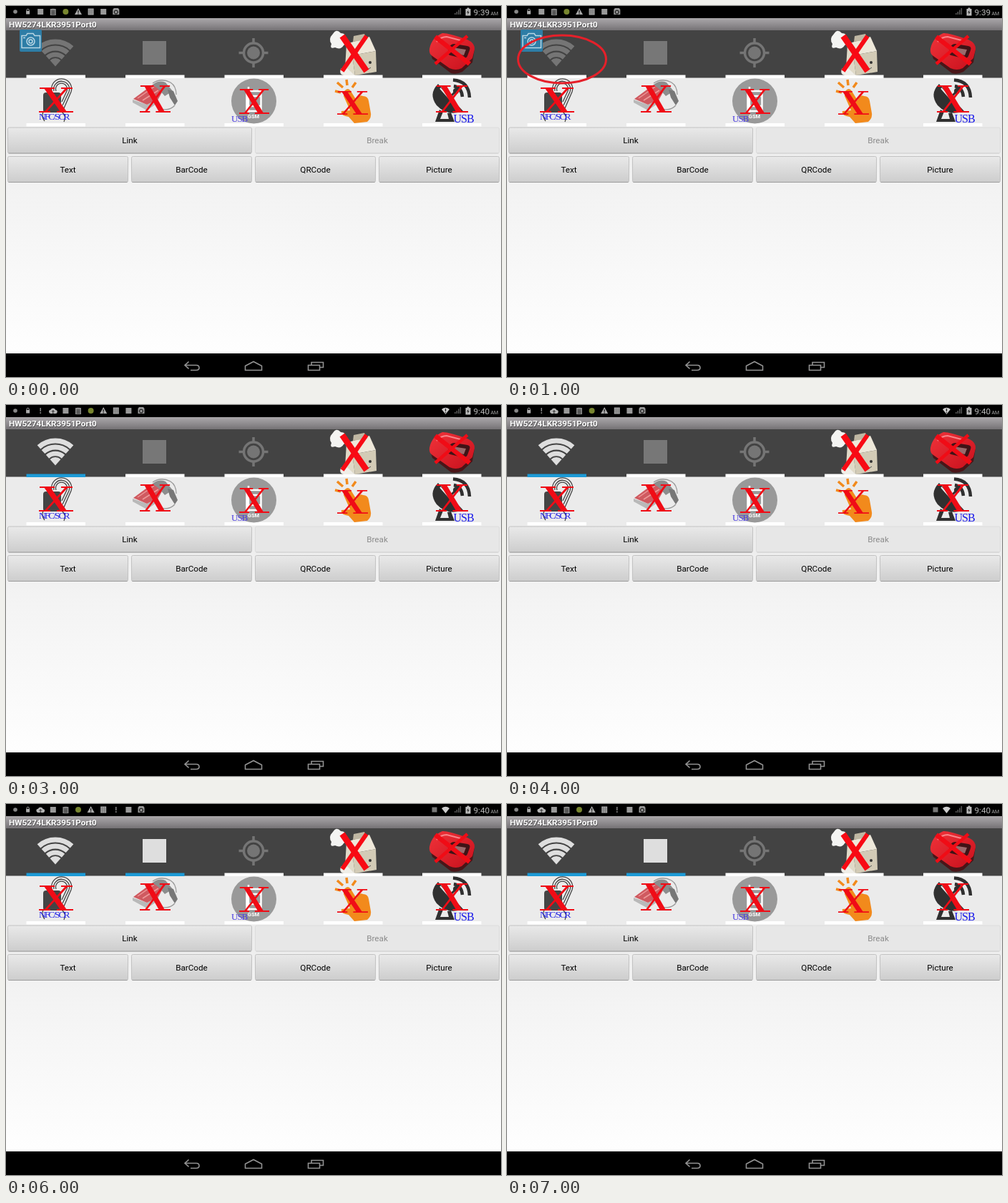
Animation, 692 px wide and 519 px high, one loop 8 s. Source, as an HTML page:

```html
<!DOCTYPE html>
<html lang="en">
<head>
<meta charset="utf-8">
<title>Port panel</title>
<style>
  html, body { margin: 0; width: 100%; height: 100%; overflow: hidden; background: #000; }
  svg { display: block; width: 692px; height: 519px; }
  text { font-family: Roboto, sans-serif; }
  .serif { font-family: "Liberation Serif", serif; }
</style>
</head>
<body>
<svg viewBox="0 0 692 519">
  <defs>
    <linearGradient id="title" x2="0" y2="1">
      <stop offset="0" stop-color="#aaa7aa"/><stop offset=".5" stop-color="#918e91"/><stop offset="1" stop-color="#757275"/>
    </linearGradient>
    <linearGradient id="page" x2="0" y2="1">
      <stop offset="0" stop-color="#ebebeb"/><stop offset=".3" stop-color="#f3f3f3"/><stop offset="1" stop-color="#fefefe"/>
    </linearGradient>
    <linearGradient id="key" x2="0" y2="1">
      <stop offset="0" stop-color="#e9e9e9"/><stop offset="1" stop-color="#cdcdcd"/>
    </linearGradient>
    <linearGradient id="red" x2="1" y2="1">
      <stop offset="0" stop-color="#f0333a"/><stop offset="1" stop-color="#c8101c"/>
    </linearGradient>

    <!-- status bar icons, centred on 0,0 -->
    <g id="usb"><circle r="2.800" fill="#888"/></g>
    <g id="lock"><rect x="-2.500" y="-1" width="5" height="4.500" fill="#aaa"/><path d="M-1.600-1v-1.200a1.600 1.600 0 0 1 3.200 0V-1" fill="none" stroke="#aaa"/></g>
    <g id="mail"><rect x="-4" y="-4" width="8" height="8" fill="#999"/></g>
    <g id="clip"><path d="M-4-4h8v9h-8z" fill="#888"/><path d="M-2-4.500h4M-2.500-1h5M-2.500 1.200h5M-2.500 3.300h5" stroke="#222"/></g>
    <g id="bot"><circle r="4" fill="#78862f"/></g>
    <g id="warn"><path d="M0-5 5 4H-5z" fill="#aaa"/><path d="M0-2v3.600M0 2.200v1.200" stroke="#111" stroke-width="1.200"/></g>
    <g id="note"><path d="M-4-4.500h8v9h-8z" fill="#aaa"/><path d="M-4-2h8M-4 0h8M-4 2h8M-1.400-4v8M1.400-4v8" stroke="#666" stroke-width=".6"/></g>
    <g id="bag"><rect x="-4" y="-4" width="8" height="8" fill="#999"/></g>
    <g id="shot"><path d="M-3-5h6l1.500 2v7h-9v-7z" fill="#999"/><circle cy=".5" r="2.400" fill="none" stroke="#222" stroke-width="1.300"/></g>
    <g id="cloud"><path d="M-3 4a2.600 2.600 0 0 1-.4-5.200 3.800 3.800 0 0 1 7 .2A2.500 2.500 0 0 1 3.200 4z" fill="#b5b5b5"/><path d="M0 4v-4M-1.700 1.500 0-.4 1.700 1.500" stroke="#222" fill="none"/></g>
    <g id="pin"><path d="M0-4v5" stroke="#888" stroke-width="1.500"/><circle cy="3" r="1" fill="#888"/></g>
    <path id="fan" d="M0 5-5.500-2Q0-6.500 5.500-2z" fill="#ccc"/>

    <path id="serifX" fill="#f00c16" d="M7 1h9l23 34h-9zM37 1h4L11 35H7.500zM1 0h21v2H1zM31 0h16v2H31zM0 34h16v2H0zM25 34h23v2H25z"/>
  </defs>

  <rect width="692" height="519"/>
  <rect y="17" width="692" height="17" fill="url(#title)"/>
  <text x="4.600" y="30.800" font-size="11.700" font-weight="700" fill="#444">HW5274LKR3951Port0</text>
  <text x="4" y="30" font-size="11.700" font-weight="700" fill="#fff">HW5274LKR3951Port0</text>
  <rect y="34" width="692" height="67" fill="#434343"/>
  <rect y="100.500" width="692" height="69" fill="#ebebeb"/>
  <rect y="169" width="692" height="317" fill="url(#page)"/>

  <g id="status"></g>
  <path d="M627 12h1.600v-2h-1.600zM629.500 12h1.600V8h-1.600zM632 12h1.600V5.500H632zM634.500 12h1.600V3h-1.600z" fill="#555"/>
  <path d="M642.500 4h2V2.500h3V4h2v9.500h-7z" fill="#bbb"/>
  <path d="M646.500 5.500 644 9.300h1.800l-.6 3 2.600-4H646z" fill="#222"/>
  <text id="clock" x="653.500" y="12.500" font-size="11.700" fill="#bbb"></text>
  <text x="677.500" y="12.500" font-size="7" fill="#aaa">AM</text>

  <g id="bars"></g>

  <g id="wifi" transform="translate(69 84.500)"></g>
  <rect id="badge" x="191" y="49" width="33" height="33"/>
  <g stroke="#757575" fill="none" stroke-width="3.500">
    <circle cx="346" cy="65.500" r="13.500"/>
    <path d="M346 45v6M346 80v6M325.500 65.500h6M360.500 65.500h6"/>
    <circle cx="346" cy="65.500" r="9" fill="#757575" stroke="none"/>
  </g>

  <!-- steaming box -->
  <g>
    <path d="M476 53 508 43 517 63 484 69z" fill="#eee8da"/>
    <path d="M484 69 517 63 518 92 488 97z" fill="#d3cbb6"/>
    <path d="M476 53 484 69 488 97 474 87z" fill="#e0dac8"/>
    <path d="M485 50 486 42 501 39 505 47z" fill="#bfb7a3"/>
    <path d="M457 39Q462 31 468 38Q476 38 473 45Q480 50 472 55Q468 62 460 58Q452 61 455 53Q450 46 457 39z" fill="#f4f4f2"/>
    <path d="M468 88Q475 84 481 91L488 97H472Q465 95 468 88z" fill="#f0eee8"/>
    <circle cx="498" cy="81" r="2" fill="#333"/><circle cx="509" cy="79" r="2" fill="#333"/>
    <path d="M498 88q6 3 12-2" fill="none" stroke="#555"/>
  </g>
  <g stroke="#f80a14" fill="none"><path d="M470 42 504 91" stroke-width="8.500"/><path d="M504 42 470 91" stroke-width="6"/></g>

  <!-- handheld -->
  <g>
    <path d="M592 60 596 74 622 94Q630 96 638 92L652 79 655 60z" fill="#4a1518"/>
    <path d="M592 60Q595 44 610 38Q616 37 645 47Q656 52 655 61L652 73 637 87Q629 91 620 87L596 70Q591 67 592 60z" fill="url(#red)"/>
    <path d="M620 57Q622 53 627 53L645 56Q650 57 648 62L645 70Q643 74 637 73L621 69Q617 68 618 63z" fill="#401316"/>
    <path d="M624 58 643 61 640 69 623 65z" fill="#9a6a6c"/>
    <path d="M602 50Q608 43 616 43L639 49" fill="none" stroke="#f88488" stroke-width="2"/>
  </g>
  <g stroke="#f00c16" fill="none"><path d="M600 43 648 81" stroke-width="6.500"/><path d="M645 42 600 81" stroke-width="4.500"/></g>

  <!-- tag reader -->
  <g fill="none" stroke="#444" stroke-width="1.300">
    <path d="M64 119A14 14 0 1 1 91 120L81 143M67 119a11 11 0 1 1 21 1L79 139M70 119a8 8 0 1 1 15 0L78 134"/>
    <path d="M56 121h17q4 0 4 4v20q0 4-4 4H56q-4 0-4-4v-20q0-4 4-4z" fill="#444" stroke="none"/>
    <path d="M52 148q-3 7 2 13M78 148q7 6 3 14"/>
  </g>

  <!-- scanner -->
  <g>
    <path d="M177 131 197 138 213 129V135L197 146 177 135z" fill="#b9b9b9"/>
    <path d="M178 130 205 110 219 119 213 130 197 138z" fill="#cf5a60"/>
    <path d="M184 129 207 113M191 132 213 118" stroke="#e99" stroke-width="1.500"/>
    <path d="M205 110Q214 103 223 107L233 119 222 126 214 117z" fill="#8d8d8d"/>
    <path d="M226 117 234 119 240 133 236 139 229 128z" fill="#777"/>
    <path d="M205 108Q217 100 230 107Q238 112 238 124M236 139Q228 148 212 143" fill="none" stroke="#999" stroke-width="1.300"/>
  </g>

  <!-- mobile -->
  <circle cx="346.500" cy="133" r="31.500" fill="#999"/>
  <path d="M339 113v36M336.500 119h20v28h-20zM336.500 126h20M336.500 140h20" fill="none" stroke="#fff" stroke-width="2.500"/>
  <text x="346" y="157" font-size="7.500" font-weight="700" fill="#fff" text-anchor="middle">GSM</text>

  <!-- tapping hand -->
  <path d="M473 119Q478 113 482 119L490 132Q493 123 499 126Q506 126 507 133L510 150Q511 157 505 162L487 164 479 155Q467 153 469 147L481 146 472 126z" fill="#f28a1c"/>
  <path d="M460 119 468 121M463 107 471 114M476 103 477 111M489 107 484 114" stroke="#f28a1c" stroke-width="3.500"/>

  <!-- dish -->
  <g fill="#303030">
    <path d="M604 109Q590 123 602 139Q617 155 639 147z"/>
    <path d="M607 115 632 143" stroke="#ebebeb" stroke-width="2"/>
    <path d="M606 145 600 162H627L622 149 617 150 619 158H607L611 148z"/>
    <path d="M619 129 629 119" stroke="#303030" stroke-width="3"/>
    <circle cx="629" cy="119" r="4"/>
    <path d="M626 112Q637 114 638 127M625 103.500Q647 105 648 128" fill="none" stroke="#303030" stroke-width="4.500"/>
  </g>

  <g id="crosses"></g>
  <text class="serif" x="46" y="158.500" font-size="13.500" letter-spacing="-2" fill="#2424e6">NFC/SCR</text>
  <text class="serif" x="315" y="161.500" font-size="13" letter-spacing="-1" fill="#4a3be0">USB</text>
  <text class="serif" x="625.500" y="163" font-size="16" letter-spacing="-1" fill="#1616ea">USB</text>

  <g id="keys" font-size="11.700" text-anchor="middle"></g>

  <g id="camera">
    <rect x="19" y="33" width="31" height="31" rx="2" fill="#2d7da6"/>
    <g fill="none" stroke="#b8d6e4" stroke-width="1.500">
      <path d="M22 41.500h6l2-3h8l2 3h7.500v17H22z"/><circle cx="34.500" cy="49.500" r="5.500"/><circle cx="34.500" cy="49.500" r="2.500"/><path d="M24 44.500h3"/>
    </g>
  </g>

  <ellipse id="ring" rx="61.500" fill="none" stroke="#e5202a" stroke-width="3"/>

  <g fill="none" stroke="#929292" stroke-width="1.600">
    <path d="M255.500 497.500 250 502.500 255.500 507.500M250 502.500H266Q270 502.500 270 506T266 509.500H258"/>
    <path d="M334.500 509.500v-6L346 497.500 357.500 503.500v6z"/>
    <path d="M422.500 502.500h16v7h-16zM427 502.500v-4h16.500v7H439"/>
  </g>
</svg>

<script>
const $ = id => document.getElementById(id);
const columns = [28.5, 167, 305.5, 444, 582];

function bar(x, y) {
  return `<rect x="${x}" y="${y}" width="82.5" height="4.5" fill="#fff"/>`;
}
$('bars').innerHTML = columns.map(x => bar(x, 96.5) + bar(x, 164)).join('');
const topBars = [...$('bars').children].filter((_, i) => i % 2 === 0);

// x, y, width, height
$('crosses').innerHTML = [
  [46, 114, 48, 35], [187, 111, 43, 38], [326, 116, 42, 35], [463, 119, 43, 33], [601, 111, 45, 38]
].map(([x, y, w, h]) =>
  `<use href="#serifX" transform="translate(${x} ${y}) scale(${w / 48} ${h / 36})"/>`).join('');

function key(label, x, y, w, off) {
  const [fill, edge, base, ink] = off
    ? ['#e7e7e7', '#dcdcdc', '#cfcfcf', '#8b8b8b']
    : ['url(#key)', '#c2c2c2', '#9c9c9c', '#000'];
  return `<rect x="${x + .5}" y="${y + .5}" width="${w - 1}" height="36" rx="2" fill="${fill}" stroke="${edge}"/>
    <path d="M${x + 1.5} ${y + 36.5}h${w - 3}" stroke="${base}"/>
    <text x="${x + w / 2}" y="${y + 22.5}" fill="${ink}">${label}</text>`;
}
$('keys').innerHTML = key('Link', 2, 169.5, 342) + key('Break', 348, 169.5, 342, true) +
  ['Text', 'BarCode', 'QRCode', 'Picture'].map((s, i) => key(s, 2 + 173 * i, 210, 169)).join('');

// Arc bands that share one apex
function band(r, width) {
  const a = 0.73, x = r * Math.sin(a), y = -r * Math.cos(a);
  return `<path d="M${-x} ${y}A${r} ${r} 0 0 1 ${x} ${y}" fill="none" stroke-width="${width}"/>`;
}
$('wifi').innerHTML = band(34.5, 7) + band(25.5, 7) + band(16.5, 6.5) +
  '<path d="M0 0-7.500-8.500A11 11 0 0 1 7.500-8.500z" fill="currentColor" stroke="none"/>';

const early = 'usb lock mail clip bot warn note bag shot';
const middle = 'usb lock pin cloud mail clip bot warn note bag shot';
const late = 'usb lock cloud mail clip bot warn note pin bag shot';
const wifiRing = [77, 74.5, 33.5], badgeRing = [211, 69, 31.5];

// One entry per second
const off = { icons: early, clock: '9:39' };
const wifiOn = { icons: middle, clock: '9:40', wifi: true };
const bothOn = { icons: late, clock: '9:40', wifi: true, badge: true };
const steps = [
  off, { ...off, ring: wifiRing },
  wifiOn, wifiOn, wifiOn, { ...wifiOn, ring: badgeRing },
  bothOn, bothOn
];

const icon = (name, x) => `<use href="#${name}" x="${x}" y="8"/>`;

function show({ icons, clock, wifi, badge, ring }) {
  $('status').innerHTML =
    icons.split(' ').map((name, i) => icon(name, 13 + 17.6 * i)).join('') +
    (wifi ? icon('fan', 614.5) : '') +
    (wifi && !badge ? '<path d="M614.500 5v4M614.500 10v1.500" stroke="#222" stroke-width="1.300"/>' : '') +
    (badge ? '<rect x="595.500" y="4.500" width="7" height="7" fill="#777"/>' : '');
  $('clock').textContent = clock;
  const tone = wifi ? '#dedede' : '#757575';
  $('wifi').setAttribute('stroke', tone);
  $('wifi').style.color = tone;
  $('badge').setAttribute('fill', badge ? '#dedede' : '#777');
  topBars[0].setAttribute('fill', wifi ? '#1c9ad6' : '#fff');
  topBars[1].setAttribute('fill', badge ? '#1c9ad6' : '#fff');
  $('camera').style.display = wifi ? 'none' : '';
  $('ring').style.display = ring ? '' : 'none';
  if (ring) ['cx', 'cy', 'ry'].forEach((k, i) => $('ring').setAttribute(k, ring[i]));
}

const start = performance.now();
let shown = -1;
function tick() {
  const step = Math.floor((performance.now() - start) / 1000) % steps.length;
  if (step !== shown) show(steps[shown = step]);
  requestAnimationFrame(tick);
}
tick();
</script>
</body>
</html>
```
